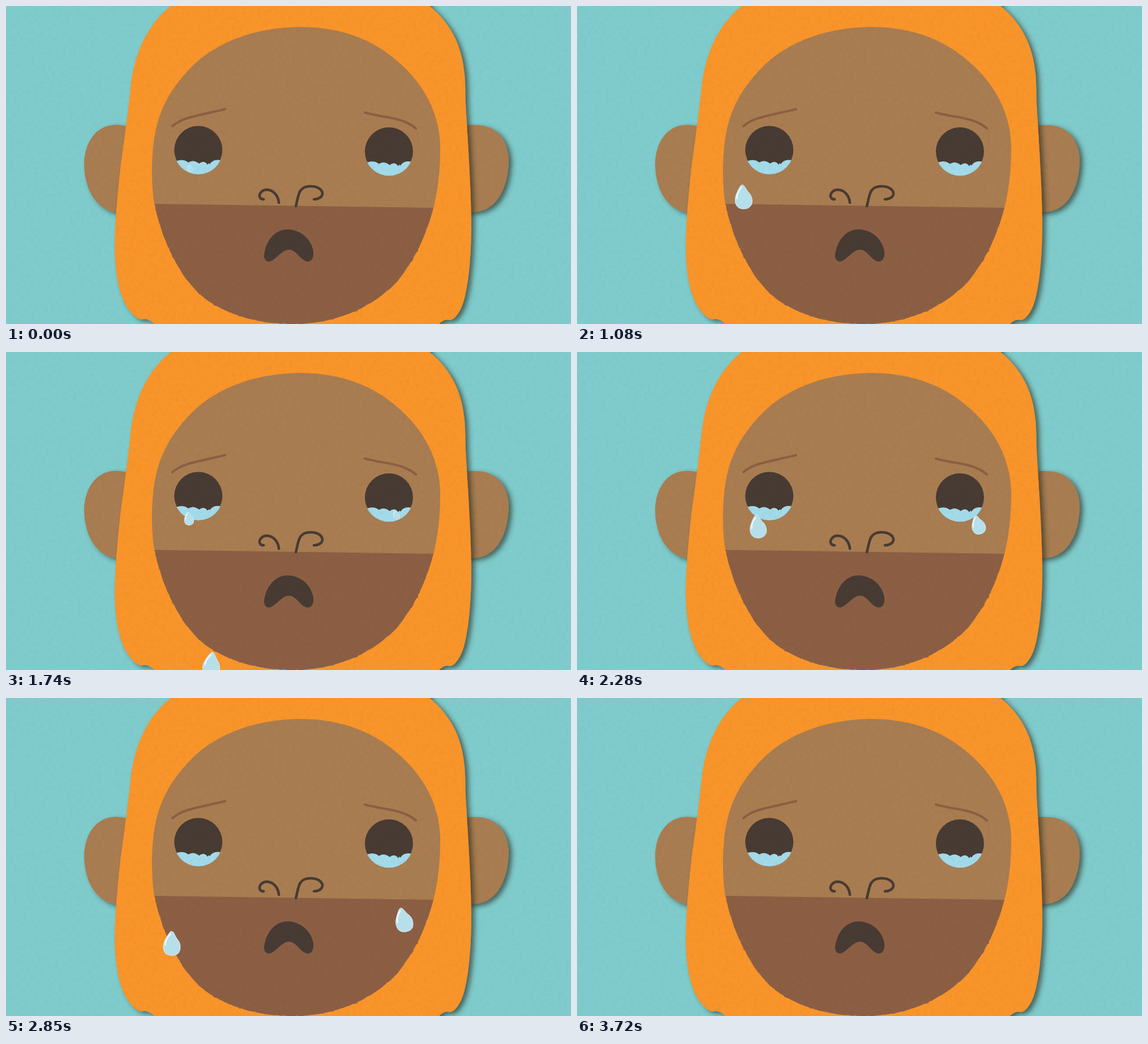
These frames come from a looping animation (998 px wide and 561 px high, 3750 ms). An HTML page:

```html
<!DOCTYPE html>
<html lang="en">
<head>
<meta charset="utf-8">
<title>Crying face</title>
<style>
  html, body { margin: 0; width: 100%; height: 100%; overflow: hidden; background: #80cccd; }
  svg { position: absolute; left: 0; top: 0; width: 998px; height: 561px; will-change: transform; }
</style>
</head>
<body>
<svg viewBox="0 0 998 561">
  <defs>
    <filter id="shadow" filterUnits="userSpaceOnUse" x="-50" y="-80" width="1100" height="760">
      <feDropShadow dx="6" dy="4" stdDeviation="4" flood-color="#2a3028" flood-opacity=".65"/>
    </filter>
    <filter id="rough" filterUnits="userSpaceOnUse" x="240" y="20" width="545" height="560" color-interpolation-filters="sRGB">
      <feTurbulence type="fractalNoise" baseFrequency=".09" numOctaves="2" seed="4"/>
      <feDisplacementMap in="SourceGraphic" scale="3" xChannelSelector="R" yChannelSelector="G"/>
    </filter>
    <filter id="paper" x="0" y="0" width="100%" height="100%">
      <feTurbulence type="fractalNoise" baseFrequency=".16" numOctaves="3" seed="9"/>
      <feColorMatrix values="0 0 0 0 0  0 0 0 0 0  0 0 0 0 0  .05 0 0 0 -.017"/>
    </filter>
    <path id="face" d="M520 37C582 37 637 54 680 88C737 132 766 187 767 249C767 290 763 325 755 356C742 405 722 448 691 486C645 535 577 561 508 561C445 561 393 546 350 515C310 482 277 420 262 349C256 312 257 264 262 232C271 177 295 140 332 103C380 59 447 37 520 37Z"/>
    <clipPath id="lower"><path d="M240 349H259L755 356H790V570H240Z"/></clipPath>
    <clipPath id="pool"><circle cx="339.7" cy="254" r="43"/></clipPath>
    <g id="eye">
      <circle cx="339.7" cy="254" r="42.5" fill="#483b34"/>
      <path clip-path="url(#pool)" fill="#a3dbeb" d="M294 277Q311 267 322 276Q331 270 341 278Q350 271 356 280Q358 276 360 279Q367 267 386 274V300H294Z"/>
    </g>
  </defs>

  <rect width="998" height="561" fill="#80cccd"/>
  <g fill="#a97d51" filter="url(#shadow)">
    <path d="M225 215C212 211 201 209 188 210C156 213 138 245 138 279C139 328 161 361 200 365L225 360Z"/>
    <path d="M800 210H833C866 211 888 237 888 274C886 327 864 364 822 364H800Z"/>
  </g>
  <path fill="#f99529" filter="url(#shadow)" d="M291 0C252 31 229 78 221 135C216 185 209 235 202 285C197 335 192 383 192 428C193 475 200 506 212 528C220 541 229 551 239 553C247 551 254 553 262 561V600H765V561C770 556 776 552 783 554C791 554 797 546 803 535C816 509 822 446 822 382C821 310 815 225 812 175C811 158 812 142 810 121C806 73 787 31 748 0V-40H291Z"/>
  <use href="#face" fill="#a97d51"/>
  <g clip-path="url(#lower)"><use href="#face" fill="#8c5f44" filter="url(#rough)"/></g>
  <g fill="none" stroke-linecap="round">
    <path stroke="#8c5f44" stroke-width="4.2" d="M294 212C312 196 337 194 387 182M634 188C664 197 700 195 724 216"/>
    <path stroke="#483b34" stroke-width="4.6" d="M455 341C443 341 447 324 461 324C474 325 481 336 482 347M512 353C517 336 515 318 538 318C555 318 563 329 557 336C553 340 549 341 544 341"/>
  </g>
  <use href="#eye"/>
  <use href="#eye" x="336.7" y="2.5"/>
  <path fill="#483b34" d="M456 438C460 412 476 394 498 394C524 395 541 415 543 434C544 447 537 453 529 450C519 446 512 430 500 430C488 430 480 444 468 450C460 453 455 447 456 438Z"/>
  <rect width="998" height="561" filter="url(#paper)"/>
</svg>

<svg viewBox="0 0 998 561">
  <defs>
    <g id="drop">
      <path fill="#b6dfea" stroke="#d3edf3" vector-effect="non-scaling-stroke" d="M-2-21.5C3-22 4-14 9-8C18 2 17 21 0 21C-17 21-18 4-12-7C-9-13-5-21-2-21.5Z"/>
      <path fill="none" stroke="#f0fafc" stroke-width="2.4" stroke-linecap="round" d="M-12 2C-12-6-7-13-3-17"/>
    </g>
  </defs>
  <g id="tears"></g>
</svg>

<script>
const LOOP = 3750, SWELL = 850, SLIDE = 1010;

// A tear grows from spawn to hang, then slides round the cheek on a Bezier curve
const LEFT = { spawn: [325, 286], hang: [320, 308], cheek: [250, 350], chin: [290, 510], exit: [410, 590], tilt: [-6, 9] };
const RIGHT = { spawn: [686, 284], hang: [717, 312], cheek: [705, 390], chin: [678, 559], exit: [590, 595], tilt: [-14, -8] };

const layer = document.getElementById('tears');
const tears = [[0, LEFT], [1430, LEFT], [1650, RIGHT]].map(([start, side]) => {
  const node = document.createElementNS('http://www.w3.org/2000/svg', 'use');
  node.setAttribute('href', '#drop');
  layer.append(node);
  return { start, side, node };
});

const mix = (a, b, u) => a + (b - a) * u;
const mixPoint = (a, b, u) => a.map((v, i) => mix(v, b[i], u));

// Repeated mixing of the control points gives the point on the curve
function bezier(points, u) {
  while (points.length > 1) {
    points = points.slice(1).map((p, i) => mixPoint(points[i], p, u));
  }
  return points[0];
}

function place({ start, side, node }, time) {
  const t = time - start;
  const shown = t >= 0 && t < SWELL + SLIDE;
  node.setAttribute('visibility', shown ? 'visible' : 'hidden');
  if (!shown) return;

  const { spawn, hang, cheek, chin, exit, tilt } = side;
  const slide = Math.max(0, (t - SWELL) / SLIDE) ** 1.23;
  const [x, y] = t < SWELL
    ? mixPoint(spawn, hang, t / SWELL)
    : bezier([hang, cheek, chin, exit], slide);
  const scale = Math.min(1, mix(.3, 1, t / 900));
  const angle = mix(...tilt, slide);
  node.setAttribute('transform', `translate(${x} ${y}) rotate(${angle}) scale(${scale})`);
  node.setAttribute('opacity', Math.min(1, .75 + t / 1200));
}

const begin = performance.now();
function tick() {
  const time = (performance.now() - begin) % LOOP;
  tears.forEach(tear => place(tear, time));
  requestAnimationFrame(tick);
}
tick();
</script>
</body>
</html>
```
